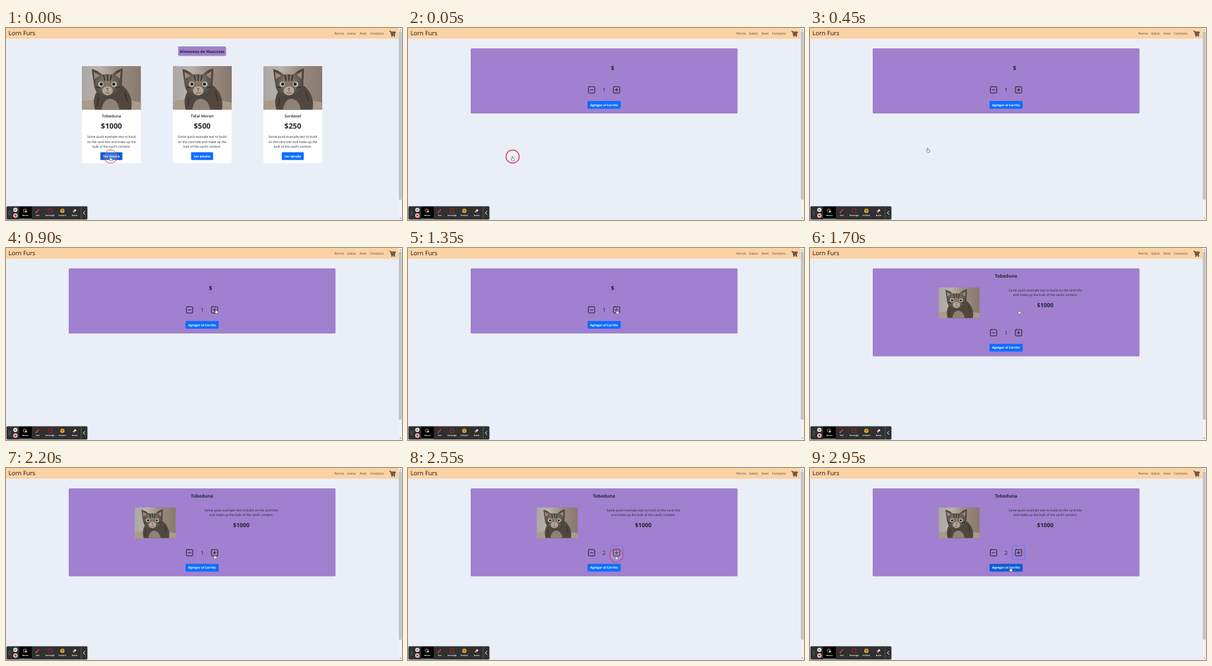
An HTML page for the animation above (3000 ms loop, 600 by 292 pixels).

```html
<!DOCTYPE html>
<html lang="es">
<head>
<meta charset="utf-8">
<title>Tienda de mascotas</title>
<style>
  html, body { margin: 0; width: 100%; height: 100%; overflow: hidden; background: #eaeff7; }
  svg { display: block; width: 100vw; height: 100vh; }
  text { font-family: "Open Sans", "Noto Sans", sans-serif; fill: #212529; text-rendering: geometricPrecision; }
  .mid { text-anchor: middle; }
  .bold { font-weight: 700; }
  .semi { font-weight: 600; }
  .button { fill: #0d6efd; }
  .button.hover { fill: #0b5ed7; }
  .light { fill: #fff; }
  .line { fill: none; stroke: #221c2c; stroke-width: 1; stroke-linecap: round; }
</style>
</head>
<body>
<svg viewBox="0 0 600 292" preserveAspectRatio="none">
  <defs>
    <linearGradient id="wall">
      <stop offset="0" stop-color="#aaa6a3"/><stop offset=".3" stop-color="#b9b3ad"/>
      <stop offset=".62" stop-color="#99897d"/><stop offset="1" stop-color="#88796f"/>
    </linearGradient>
    <radialGradient id="fur" cy=".45">
      <stop offset="0" stop-color="#8b7d70"/><stop offset=".6" stop-color="#6c6056"/>
      <stop offset="1" stop-color="#4b433d"/>
    </radialGradient>
    <symbol id="kitten" viewBox="0 0 90 67" preserveAspectRatio="none">
      <rect width="90" height="67" fill="url(#wall)"/>
      <path d="M0 54Q45 46 90 56V67H0Z" fill="#a99a8a"/>
      <path d="M20 67Q14 45 28 34L62 30Q79 45 75 67Z" fill="#51473f"/>
      <path d="M30 67Q32 52 42 50Q55 51 57 67Z" fill="#8e8175"/>
      <path d="M18 27L15 5Q24 7 31 13H46Q53 6 62 4L61 28Q60 47 40 50Q20 46 18 27Z" fill="url(#fur)"/>
      <path d="M19 20L18 9L27 15ZM51 14L59 8L58 20Z" fill="#a08679"/>
      <path d="M33 14L35 23M39 13V23M45 14L43 23M21 32L28 34M58 32L51 34M65 39L69 54M25 48L23 62" stroke="#39322e" stroke-width="1.8" fill="none"/>
      <ellipse cx="39" cy="38" rx="8" ry="7" fill="#b5a698"/>
      <g fill="#c0c6bd"><circle cx="29" cy="28" r="4"/><circle cx="49" cy="28" r="4"/></g>
      <g fill="#24211f"><circle cx="29.5" cy="28" r="2.4"/><circle cx="48.5" cy="28" r="2.4"/></g>
      <path d="M36.5 34H41.5L39 37Z" fill="#8c5f57"/>
      <path d="M39 37V40M35 41Q39 43 43 41" stroke="#574a43" fill="none" stroke-width=".8"/>
    </symbol>
    <clipPath id="cardTop"><path d="M0 68V1.5Q0 0 1.5 0H88.5Q90 0 90 1.5V68Z"/></clipPath>
  </defs>

  <rect width="600" height="292" fill="#eaeff7"/>
  <rect width="595" height="16.3" fill="#fbd2a4"/>
  <text x="3.8" y="11.3" font-size="9.2" style="fill:#15110c">Lorn Furs</text>
  <g id="nav" class="semi" font-size="4.7"></g>
  <g fill="none" stroke="#1d1915" stroke-width=".9" stroke-linejoin="round">
    <path d="M580.8 4.8H582.6L584.2 10.6H589.2M583 6H590L588.9 9.2H583.9"/>
    <path d="M583.4 7.6H589.4M585.5 6V9M587.5 6V9" stroke-width=".6"/>
    <circle cx="584.8" cy="12.2" r=".7"/><circle cx="588.4" cy="12.2" r=".7"/>
  </g>

  <g id="shop">
    <rect x="260.8" y="28" width="72.6" height="14.4" rx="1.5" fill="#a180cf"/>
    <text class="mid bold" x="297" y="37.6" font-size="5.9">Alimentos de Mascotas</text>
  </g>

  <g id="detail">
    <rect id="panel" x="95" y="31" width="404.3" rx="1.5" fill="#a180cf"/>
    <text id="loading" class="mid bold" x="310" y="63.5" font-size="8.75">$</text>
    <g id="product">
      <text class="mid bold" x="297" y="45" font-size="6.9">Tobeduna</text>
      <use href="#kitten" x="194.8" y="60" width="62.4" height="46.8"/>
      <g class="mid" font-size="4.84">
        <text x="356.5" y="65.5">Some quick example text to build on the card title</text>
        <text x="356.5" y="73">and make up the bulk of the card's content.</text>
      </g>
      <text class="mid bold" x="356.5" y="89.8" font-size="8.75">$1000</text>
    </g>
    <g id="controls">
      <rect id="focus" x="306.4" y="83.4" width="19.4" height="20.8" rx="1.5" fill="none" stroke="#6c78ec" stroke-width="1"/>
      <g class="line">
        <rect x="273.3" y="89.3" width="9.6" height="9.6" rx="1"/><path d="M275.8 94.1H280.4"/>
        <rect x="311.2" y="89.3" width="9.6" height="9.6" rx="1"/><path d="M313.7 94.1H318.3M316 91.8V96.4"/>
      </g>
      <text id="count" class="mid" x="297" y="97.1" font-size="8.2"></text>
      <rect id="addButton" class="button" x="272" y="111" width="50.2" height="11.8" rx="1.2"/>
      <text class="mid bold light" x="297" y="118.7" font-size="4.75">Agregar al Carrito</text>
    </g>
  </g>

  <rect x="594.7" width="5.3" height="292" fill="#f1f1f1"/>
  <rect x="595.2" y="5.4" width="4.2" height="255.6" fill="#c1c1c1"/>
  <path d="M596.1 3.4L597.4 1.9L598.7 3.4ZM596.1 288.4L597.4 289.9L598.7 288.4Z" fill="#606060"/>

  <g id="toolbar">
    <rect x=".4" y="270.9" width="123.2" height="20.6" rx="2" fill="#303030" stroke="#b9bfc7" stroke-width=".7"/>
    <rect x="20" y="271.8" width="19" height="18.4" fill="#000"/>
    <path d="M20 290H39" stroke="#a5d3df" stroke-width=".7"/>
    <path d="M4.8 278.5V285M6.6 278.5V285" stroke="#aaa" stroke-width=".8" stroke-dasharray=".8 1.2"/>
    <circle cx="14.2" cy="276.6" r="3.2" fill="#f5f5f5"/>
    <path d="M13.3 275.2V278M15.1 275.2V278" stroke="#333" stroke-width=".8"/>
    <circle cx="14.2" cy="285.2" r="3.2" fill="#f3d5d8"/>
    <rect x="12.7" y="283.7" width="3" height="3" rx=".5" fill="#d9293f"/>
    <circle cx="28.6" cy="277.7" r="2.5" fill="none" stroke="#e5a47c" stroke-width=".8"/>
    <path d="M28.7 277.3L32.4 279.2L30.8 279.7L30.2 281.3Z" fill="#fff"/>
    <path d="M45.7 280.4L50 276.1" stroke="#d82d42" stroke-width="2"/>
    <path d="M45 281.2L46.4 280.8L45.3 279.7Z" fill="#eee"/>
    <rect x="64" y="275.2" width="5.6" height="5.6" fill="none" stroke="#b32335" stroke-width=".9"/>
    <circle cx="85.4" cy="278" r="3.2" fill="#f3b72f"/>
    <path d="M83.4 277H87.4" stroke="#493113" stroke-width="1"/>
    <path d="M83.7 278.7Q85.4 281.6 87.1 278.7Z" fill="#c43b35"/>
    <path d="M101.9 279.9L105.7 276.5" stroke="#e58b9b" stroke-width="2.7"/>
    <path d="M104 278L105.7 276.5" stroke="#eee" stroke-width="2.7"/>
    <path d="M114 272V290.6" stroke="#777" stroke-width=".6"/>
    <path d="M119.7 278.5L117.3 281.2L119.7 283.9" fill="none" stroke="#fff" stroke-width="1"/>
    <g id="tools" class="mid bold" font-size="2.85"></g>
  </g>

  <circle id="ring" r="10" fill="#fff" fill-opacity=".15" stroke="#df3e5b"/>
  <path id="hand" d="M-1.1 -.3Q-.4 -1.1 .2 -.3V2L2.4 2.5Q3 2.8 2.9 3.6L2.4 6H-.8L-2.4 3.6Q-2.2 2.8 -1.1 3.4Z" fill="#fff" stroke="#34343c" stroke-width=".55" stroke-linejoin="round"/>
</svg>
<script>
const LOOP = 3000, STEP = 50;
const OPEN = 50, LOADED = 1550, CLICK = 2400;
const $ = id => document.getElementById(id);
const show = (id, on) => $(id).setAttribute("display", on ? "inline" : "none");
const add = (id, markup) => $(id).insertAdjacentHTML("beforeend", markup);

[["Perros", 497.4], ["Gatos", 517], ["Aves", 535.7], ["Contacto", 551.6]].forEach(([label, x]) =>
  add("nav", `<text x="${x}" y="9.9" style="fill:#706050">${label}</text>`));

["Mouse", "Pen", "Rectangle", "Stickers", "Eraser"].forEach((label, i) =>
  add("tools", `<text class="light" x="${29.5 + i * 18.65}" y="286.3">${label}</text>`));

const blurb = ["Some quick example text to build", "on the card title and make up the", "bulk of the card's content."];
[["Tobeduna", 1000], ["Tidal Moren", 500], ["Sordavel", 250]].forEach(([name, price], i) =>
  add("shop", `<g transform="translate(${115 + i * 137.4} 57.4)">
    <rect width="89.6" height="148.4" rx="1.5" fill="#fff" stroke="#dfe3ea" stroke-width=".3"/>
    <use href="#kitten" width="89.6" height="67" clip-path="url(#cardTop)"/>
    <g class="mid">
      <text class="semi" x="44.8" y="78.6" font-size="6.1">${name}</text>
      <text class="bold" x="44.8" y="95.4" font-size="11.2">$${price}</text>
      ${blurb.map((line, n) => `<text x="44.8" y="${109.7 + n * 7.5}" font-size="4.77">${line}</text>`).join("")}
      <rect class="button${i ? "" : " hover"}" x="28" y="131.6" width="33.4" height="11.8" rx="1.2"/>
      <text class="bold light" x="44.7" y="139.3" font-size="4.7">Ver detalle</text>
    </g></g>`));

// Pointer stops: time, x, y
const path = [[0, 158.5, 196], [350, 158.5, 196], [800, 318.5, 93.5], [950, 318.5, 93.5],
  [1250, 317, 94.5], [1850, 317, 94.5], [2150, 316.5, 132], [2500, 316.5, 132], [2800, 304, 151.5], [LOOP, 304, 151.5]];

function pointerAt(t) {
  const i = path.findIndex(stop => stop[0] > t);
  const [t0, x0, y0] = path[i - 1], [t1, x1, y1] = path[i];
  const u = (t - t0) / (t1 - t0), ease = u * u * (3 - 2 * u);
  return [x0 + (x1 - x0) * ease, y0 + (y1 - y0) * ease];
}

function ringOpacity(t) {
  if (t < 350) return Math.min(1, (350 - t) / 200);
  const age = t - CLICK;
  return age < 0 || age >= 250 ? 0 : Math.min(1, (250 - age) / 150);
}

function render(t) {
  const [x, y] = pointerAt(t);
  const loaded = t >= LOADED, added = t >= CLICK, shift = loaded ? 34.8 : 0;
  show("shop", t < OPEN);
  show("detail", t >= OPEN);
  show("product", loaded);
  show("loading", !loaded);
  show("focus", added);
  $("panel").setAttribute("height", 99 + shift);
  $("controls").setAttribute("transform", `translate(0 ${shift})`);
  $("count").textContent = added ? 2 : 1;
  const over = x > 272 && x < 322 && y > 111 + shift && y < 123 + shift;
  $("addButton").classList.toggle("hover", over);
  $("hand").setAttribute("transform", `translate(${x} ${y})`);
  $("ring").setAttribute("transform", `translate(${x} ${y - .5})`);
  $("ring").setAttribute("stroke-width", t < OPEN ? 1 : 1.4);
  $("ring").setAttribute("opacity", ringOpacity(t));
}

const start = performance.now();
function tick() {
  const elapsed = (performance.now() - start) % LOOP;
  render(Math.floor(elapsed / STEP) * STEP);
  requestAnimationFrame(tick);
}
tick();
</script>
</body>
</html>
```
